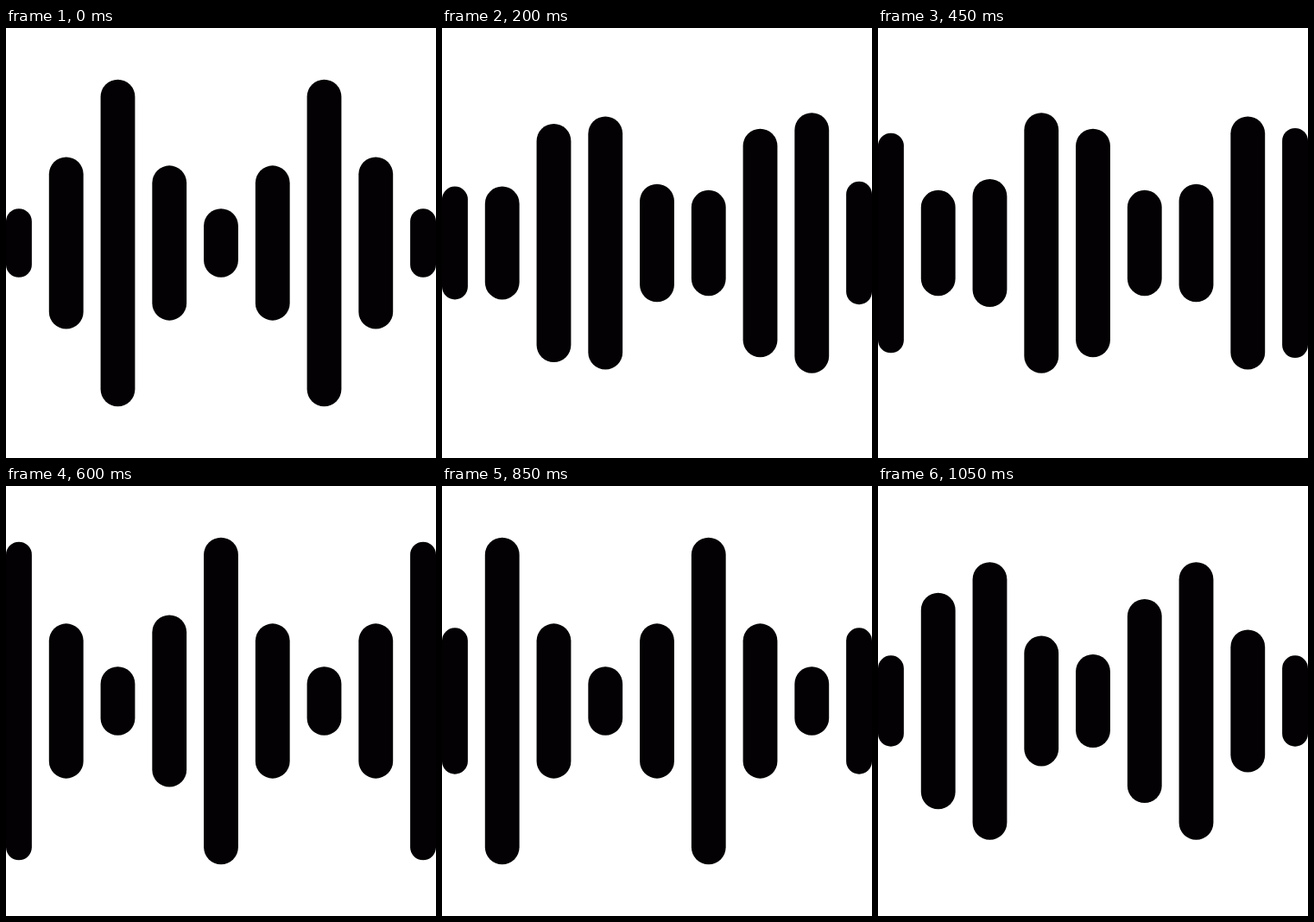
Write an HTML page without scripts that moves like this. It is 498 px wide and 498 px high and loops after 1.1 s.

```html
<!DOCTYPE html>
<html lang="en">
<head>
<meta charset="utf-8">
<title>Sound wave</title>
<style>
@property --tick { syntax: "<number>"; inherits: true; initial-value: 0; }
@property --skip { syntax: "<number>"; inherits: true; initial-value: 0; }

html, body {
  margin: 0;
  width: 100%;
  height: 100%;
  overflow: hidden;
  background: #fff;
}

svg {
  display: block;
  width: 100%;
  height: 100%;
  animation: tick 1100ms steps(22) infinite, skip 1100ms step-end infinite;
}

/* 22 ticks cover 28 steps: after the first seven, every fourth step is skipped */
@keyframes tick { from { --tick: 0; } to { --tick: 22; } }
@keyframes skip {
  0% { --skip: 0; }
  31.818% { --skip: 1; }
  45.454% { --skip: 2; }
  59.09% { --skip: 3; }
  72.727% { --skip: 4; }
  86.363% { --skip: 5; }
  100% { --skip: 5; }
}

/* Each bar blends linearly between four half-heights, seven steps per pose */
rect {
  --p: calc((var(--tick) + var(--skip)) / 7);
  --wa: max(0, 1 - var(--p), var(--p) - 3);
  --wb: max(0, min(var(--p), 2 - var(--p)));
  --wc: max(0, min(var(--p) - 1, 3 - var(--p)));
  --wd: max(0, min(var(--p) - 2, 4 - var(--p)));
  --half: calc(1px * (var(--a) * var(--wa) + var(--b) * var(--wb) + var(--c) * var(--wc) + var(--d) * var(--wd)));
  y: calc(250px - var(--half));
  height: calc(2 * var(--half));
  width: 40px;
  rx: 20px;
  ry: 20px;
  fill: #030104;
}

.edge { width: 30px; rx: 15px; ry: 15px; }
</style>
</head>
<body>
<svg viewBox="0 0 500 500">
  <rect class="edge" x="0" style="--a:40; --b:85; --c:185; --d:85"/>
  <rect x="50" style="--a:100; --b:40; --c:90; --d:190"/>
  <rect x="110" style="--a:190; --b:100; --c:40; --d:90"/>
  <rect x="170" style="--a:90; --b:190; --c:100; --d:40"/>
  <rect x="230" style="--a:40; --b:90; --c:190; --d:90"/>
  <rect x="290" style="--a:90; --b:40; --c:90; --d:190"/>
  <rect x="350" style="--a:190; --b:90; --c:40; --d:90"/>
  <rect x="410" style="--a:100; --b:190; --c:90; --d:40"/>
  <rect class="edge" x="470" style="--a:40; --b:95; --c:185; --d:85"/>
</svg>
</body>
</html>
```
